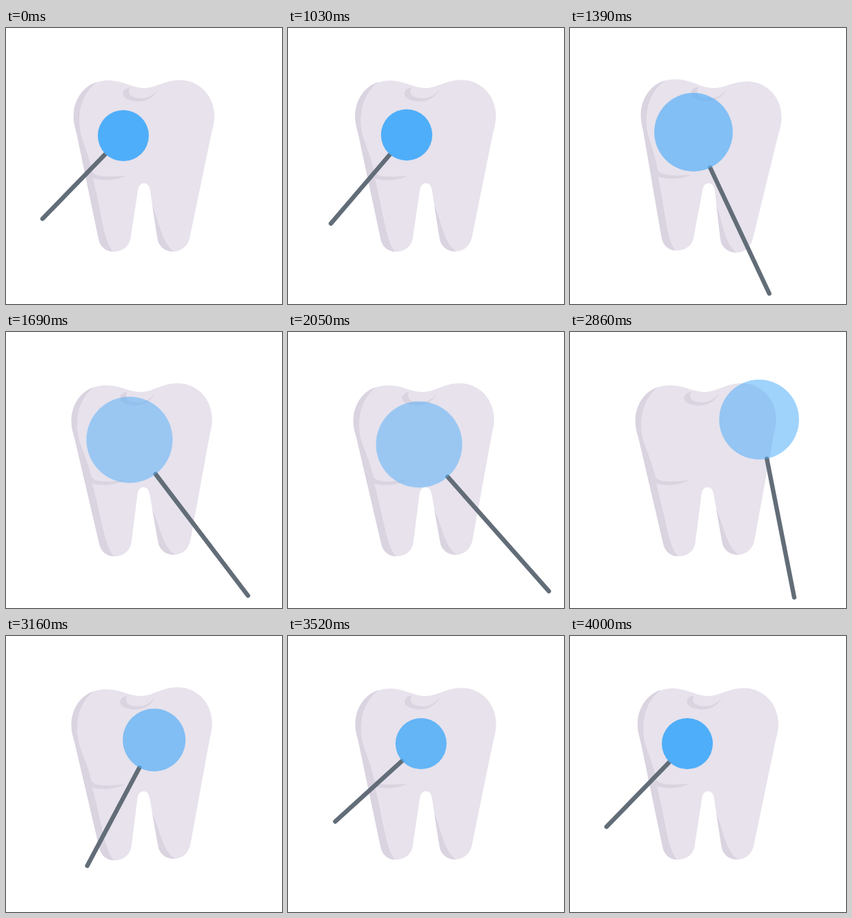
Write an HTML page that moves like this. It is 400x400 px and loops after 4.03 s.

```html
<!DOCTYPE html>
<html>
<head>
<meta charset="utf-8">
<style>
html, body { margin: 0; width: 100%; height: 100%; overflow: hidden; background: #fff; }
svg { display: block; width: 100%; height: 100%; }
</style>
</head>
<body>
<svg viewBox="0 0 400 400">
  <g id="tooth">
    <path fill="#e7e2ec" d="M200 87C217 87 230 75.5 252 75.5C280 75.5 302 98 302 128C302 139 299 146 297 156L266 305
      C263 317 253 324 242 324C230 324 221 316 219.5 305L209 236C208 229 205 225 200 225C195 225 192 229 191 236L180.5 305
      C179 316 169 324 157 324C145 324 136 317 134 305L103 156C101 146 98 139 98 128C98 98 120 76 148 76C170 76 183 87 200 87Z"/>
    <g fill="#dad3e0">
      <path d="M132 78C112 84 98 104 98 128C98 139 101 146 103 156L134 305C136 317 145 324 155 324
        C141 308 139 270 126 218C147 223 162 219 174 214C150 216 130 217 125 208C120 185 114 172 109 156C102 130 107 96 132 78Z"/>
      <path d="M212 257L219.5 305C221 316 230 324 243 324C225 310 223 283 212 257Z"/>
      <path d="M180 86C167 88 166 100 178 104C194 110 213 105 221 88C213 100 200 104 188 101C178 99 176 92 180 86Z"/>
    </g>
  </g>
  <line id="handle" y1="1" stroke="#626d78" stroke-width="6.4" stroke-linecap="round"/>
  <circle id="lens" fill="#4faef9"/>
</svg>
<script>
const LOOP = 4030, STEP = 30, REST = 1030, REACH = 4.54;
const [tooth, lens, handle] = ['tooth', 'lens', 'handle'].map(id => document.getElementById(id));

function set(el, attrs) {
  for (const name in attrs) el.setAttribute(name, attrs[name]);
}

// s: seconds of movement, 0 to 3
function pose(s) {
  // Eased step from 0 to 1 between two moments
  const ramp = (from, to) => {
    const u = Math.min(1, Math.max(0, (s - from) / (to - from)));
    return u * u * (3 - 2 * u);
  };
  const bump = peak => ramp(peak - .2, peak) - ramp(peak, peak + .2);
  // The first swing of the handle already begins at the end of the previous loop
  const swing = ramp(-.1, .53) + ramp(2.9, 3.53);

  return {
    x: 170 + 9 * ramp(0, .1) + 118 * ramp(.915, 1.63) - 107 * ramp(1.63, 2.4)
      + 8 * ramp(2.4, 2.7) - 28 * ramp(2.7, 3),
    y: 156 - 5 * ramp(0, .1) + 12 * ramp(.39, 1.05) - 47 * ramp(1.05, 1.52) + 40 * ramp(1.62, 2.32),
    r: 37 + 25.5 * (ramp(0, .56) - ramp(1.62, 2.5)),
    angle: 50 - 86 * swing - 5.5 * ramp(.53, 1.05) + 25 * ramp(1.05, 1.6)
      + 70 * ramp(1.74, 2.45) - 30 * ramp(2.45, 2.7) + 26.5 * ramp(2.7, 2.9),
    opacity: 1 - .5 * (ramp(0, .63) - ramp(1.62, 3)),
    tilt: 3.4 * (bump(.39) + bump(2.4)) - 1.4 * (ramp(0, .1) - ramp(2.5, 2.7))
  };
}

function draw(now) {
  const moving = now % LOOP - REST;
  const s = moving < 0 ? 0 : (Math.floor(moving / STEP) + 1) * STEP / 1000;
  const { x, y, r, angle, opacity, tilt } = pose(s);
  set(tooth, { transform: `rotate(${tilt} 200 262)` });
  set(lens, { cx: x, cy: y, r, 'fill-opacity': opacity });
  set(handle, { transform: `translate(${x} ${y}) rotate(${angle})`, y1: r, y2: r * REACH });
}

function tick() {
  draw(performance.now());
  requestAnimationFrame(tick);
}
tick();
</script>
</body>
</html>
```
